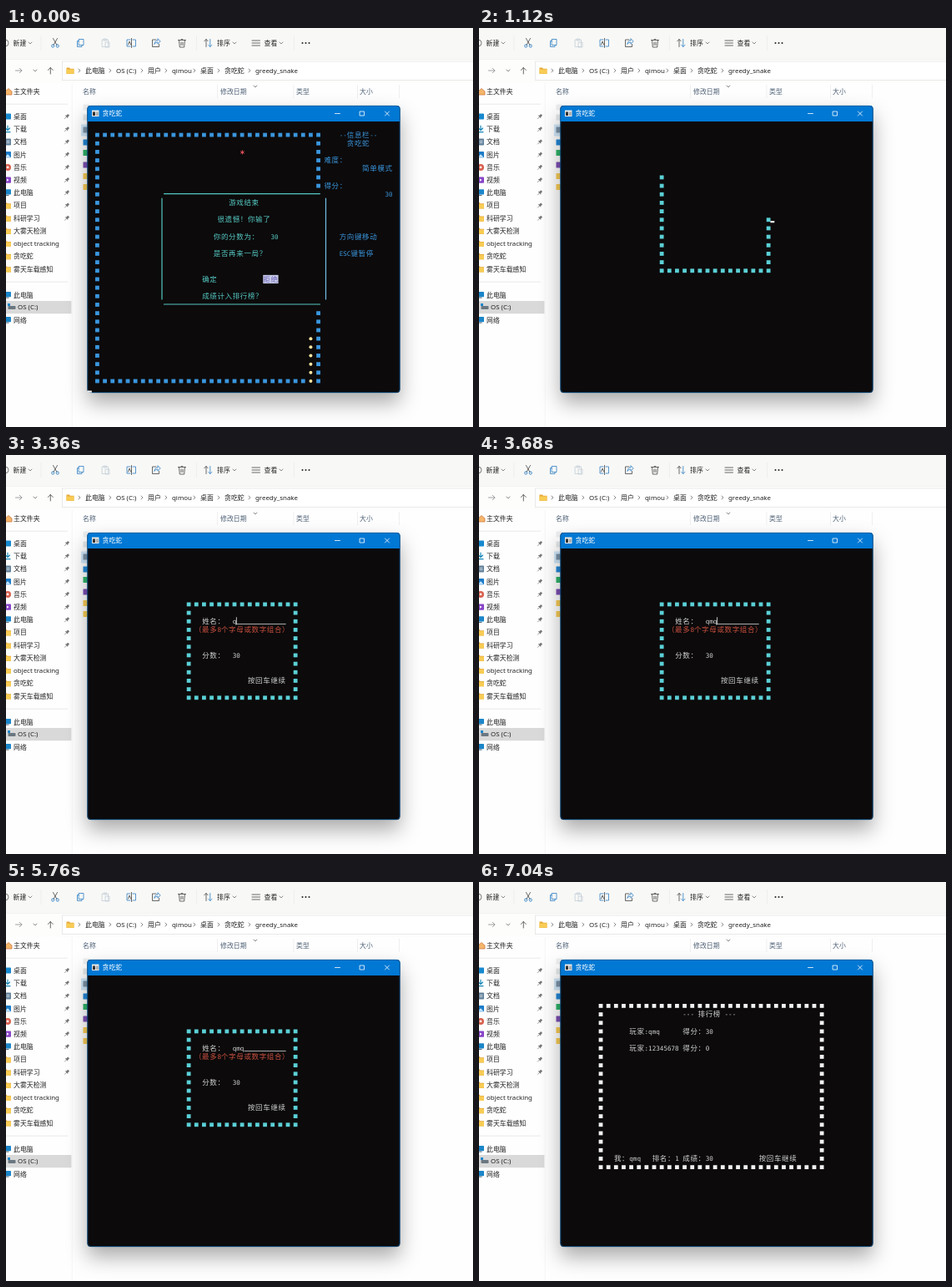
An HTML page for the animation above (7200 ms loop, 560 by 478 pixels).

```html
<!DOCTYPE html>
<html lang="zh-CN">
<head>
<meta charset="utf-8">
<title>贪吃蛇</title>
<style>
  html, body { margin: 0; width: 100%; height: 100%; overflow: hidden; background: #fefefe; }
  svg { display: block; }
  .ui { font: 7.9px "Noto Sans", "Noto Sans CJK SC", "Noto Sans CJK", sans-serif; }
  .cjk { font: 300 8.5px "Noto Sans Mono CJK SC", "Noto Sans CJK SC", "Noto Sans CJK", monospace; letter-spacing: .64px; }
  .mono { font: 7.6px "DejaVu Sans Mono", "Liberation Mono", monospace; }
  .shadow { filter: drop-shadow(0 12px 12px rgba(0, 0, 0, .33)); }
</style>
</head>
<body>
<svg id="stage" width="560" height="478" viewBox="0 0 560 478"></svg>
<script>
const LOOP = 7200, STEP = 160;
const USER = 'qimou', PLAYER = 'qmq';
const BLUE = '#3a96dd', CYAN = '#5bd0d6', TEAL = '#55c8c2', WHITE = '#d2d2d2', RED = '#c8503f';
const INK = '#222', GREY = '#5c5c5c', FOLDER = '#f8cc55';
const stage = document.getElementById('stage');

function el(parent, name, attrs, text) {
  const node = document.createElementNS('http://www.w3.org/2000/svg', name);
  for (const key in attrs) node.setAttribute(key, attrs[key]);
  if (text !== undefined) node.textContent = text;
  return parent.appendChild(node);
}
const group = (parent = stage) => el(parent, 'g', {});
const rect = (p, x, y, width, height, fill, more) => el(p, 'rect', { x, y, width, height, fill, ...more });
const path = (p, d, stroke, width = .8, fill = 'none') =>
  el(p, 'path', { d, stroke, fill, 'stroke-width': width, 'stroke-linecap': 'round', 'stroke-linejoin': 'round' });
const dot = (p, cx, cy, r, fill, more) => el(p, 'circle', { cx, cy, r, fill, ...more });
const label = (x, y, text, fill = INK) => el(stage, 'text', { x, y: y + 2.9, fill, class: 'ui' }, text);
const show = (node, on) => node.setAttribute('visibility', on ? 'inherit' : 'hidden');

// ---------- file manager ----------
const chevron = (x, y, color = GREY) => path(stage, `M${x - 2} ${y - 1}l2 2l2-2`, color, .7);
const vline = (x, y, h, color = '#ebebeb') => rect(stage, x, y, .8, h, color);

function folder(x, y) {
  path(stage, `M${x} ${y - 3.5}h3.5l1 1.2h4.5v6.2h-9z`, 'none', 0, '#e5a93a');
  rect(stage, x, y - 1.6, 9, 5.4, FOLDER, { rx: .6 });
}
function monitor(x, y) {
  rect(stage, x, y - 4, 9, 6.2, '#1b86c9', { rx: .8 });
  rect(stage, x + 2.5, y + 2.6, 4, 1, '#4b6070');
}
function pin(y) {
  const g = el(stage, 'g', { transform: `translate(73 ${y}) rotate(45)` });
  path(g, 'M-1.3-3h2.6v2.6l1.2 1.2h-5l1.2-1.2z', 'none', 0, '#777');
  path(g, 'M0 1v2.6', '#777', .7);
}

function drawToolbar() {
  rect(stage, 0, 0, 560, 38, '#f8f8f6');
  rect(stage, 0, 37.5, 560, .8, '#ededeb');
  dot(stage, -1, 18, 4, 'none', { stroke: GREY, 'stroke-width': .8 });
  label(8.5, 18, '新建');
  chevron(29, 18);
  [41.5, 228, 345].forEach(x => vline(x, 9, 18));

  path(stage, 'M56.5 12.5l4.5 8M61.5 12.5l-4.5 8', '#444');
  [56.2, 61.8].forEach(x => dot(stage, x, 21.5, 1.6, 'none', { stroke: '#2f7fc4', 'stroke-width': .9 }));
  path(stage, 'M87.5 13.5h5.5v7h-5.5zM87.5 15.5h-2v7h5.5v-2', '#2f7fc4');
  path(stage, 'M115.5 14h7v8.5h-7zM117.5 13h3v2h-3zM119.5 17h4.5v6h-4.5z', '#c3ced8');
  path(stage, 'M149 14h-4v8h4M152 14h3.5v8h-3.5', '#2f7fc4');
  path(stage, 'M150.5 12.5v11M146.5 20l1.6-4l1.6 4', '#444');
  path(stage, 'M180 14h-4.5v8.5h8v-3', '#444');
  path(stage, 'M178 19q.5-4 4-4v-2.3l3.2 3.3l-3.2 3.2v-2q-2.5 0-4 1.8z', '#2f7fc4');
  path(stage, 'M206.5 14.5h9M209.5 14.5q1.5-3 3 0M207.5 14.5l.8 8.5h5.4l.8-8.5M210 17v3.5M212 17v3.5', '#444');
  path(stage, 'M240 22.5v-9l-2.2 2.3M240 13.5l2.2 2.3', '#444');
  path(stage, 'M244.8 13.5v9l-2.2-2.3M244.8 22.5l2.2-2.3', '#2f7fc4');
  label(253, 18, '排序');
  chevron(274, 18);
  [15, 18, 21].forEach(y => path(stage, `M295 ${y}h9.5`, '#444'));
  label(309.5, 18, '查看');
  chevron(330, 18);
  [355.5, 359.5, 363.5].forEach(x => dot(stage, x, 18, 1, INK));
}

function drawAddress() {
  rect(stage, 0, 38, 560, 28, '#fdfdfc');
  path(stage, 'M11.5 51h7.5M16.3 48.3l2.7 2.7l-2.7 2.7', '#8a8a8a');
  chevron(35, 51);
  path(stage, 'M53.3 55v-7.5M50.3 50.5l3-3l3 3', '#444');
  rect(stage, 67.5, 40, 500, 22.5, '#fff', { stroke: '#e4e4e4', 'stroke-width': .8 });
  folder(72.5, 51);
  const crumbs = [[95, '此电脑'], [132, 'OS (C:)'], [170, '用户'], [199, USER], [233, '桌面'], [262, '贪吃蛇'], [299, 'greedy_snake']];
  for (const [x, text] of crumbs) {
    path(stage, `M${x - 8} ${49}l2 2l-2 2`, GREY, .7);
    label(x, 51, text);
  }
}

function drawSidebar() {
  const row = i => 106 + 15.22 * i;
  path(stage, 'M-1 76l4-3.5l4 3.5v4h-8z', '#c96f35', .7, '#f5b66b');
  label(9, 76, '主文件夹');
  rect(stage, 0, 90.7, 74, .8, '#e3e3e3');
  rect(stage, 0, 303.7, 74, .8, '#e3e3e3');
  const names = ['桌面', '下载', '文档', '图片', '音乐', '视频', '此电脑', '项目', '科研学习',
    '大雾天检测', 'object tracking', '贪吃蛇', '雾天车载感知'];
  names.forEach((name, i) => {
    const y = row(i);
    label(9, y, name);
    if (i < 9) pin(y);
    if (i > 6) folder(-3, y);
  });
  rect(stage, -2, row(0) - 3.5, 8, 7, '#1789cf', { rx: .8 });
  path(stage, `M2 ${row(1) - 4}v5M-.5 ${row(1) - 1.2}l2.5 2.5l2.5-2.5M-1 ${row(1) + 3.5}h6`, '#1787b8', 1.2);
  rect(stage, -1, row(2) - 4, 7, 8, '#65839c', { rx: .8 });
  path(stage, `M1 ${row(2) - 1}h3M1 ${row(2) + 1}h3`, '#fff', .7);
  rect(stage, -2, row(3) - 3.7, 8, 7.4, '#1c7cc9', { rx: .8 });
  path(stage, `M-1 ${row(3) + 3}l3-3.5l3.5 3.5z`, 'none', 0, '#cfeaff');
  dot(stage, 2, row(4), 4, '#d9604f');
  dot(stage, 2, row(4), 1.4, '#fff');
  rect(stage, -2, row(5) - 3.7, 8, 7.4, '#8844c8', { rx: .8 });
  path(stage, `M1 ${row(5) - 1.6}l2.6 1.6l-2.6 1.6z`, 'none', 0, '#fff');
  monitor(-3, row(6));

  monitor(-3, 320);
  label(9, 320, '此电脑');
  rect(stage, 0, 327, 78.5, 15.2, '#d9d9d9');
  rect(stage, 2.5, 333, 9, 4, '#6b7780', { rx: .8 });
  rect(stage, 2, 330, 3, 3, '#1b86c9');
  label(14, 334.5, 'OS (C:)');
  monitor(-3, 350);
  label(9, 350, '网络');
  vline(78.8, 66, 412, '#f4f4f4');
}

function drawColumns() {
  const heads = [[92, '名称'], [257, '修改日期'], [348, '类型'], [424, '大小']];
  heads.forEach(([x, text]) => label(x, 76, text, '#4f6176'));
  [253, 344.5, 421, 471].forEach(x => vline(x, 68, 16));
  chevron(299, 70);
  rect(stage, 90, 115.5, 10, 14, '#cfe6f8');
  const icons = [[95, '#eceeef'], [107, '#e2e6e8'], [122, '#7c93a8'], [137, '#2488d8'],
    [149.5, '#2fb56a'], [164, '#7d4fb3'], [177.5, FOLDER], [190.5, FOLDER]];
  icons.forEach(([y, color]) => rect(stage, 92.5, y - 3.5, 8, 7, color, { rx: .6 }));
}

function drawWindow() {
  rect(stage, 97.5, 93, 375, 344, '#0c0a0b', { rx: 4, class: 'shadow' });
  path(stage, 'M97.5 112v-15q0-4 4-4h367q4 0 4 4v15z', 'none', 0, '#0078d4');
  rect(stage, 97.8, 93.3, 374.4, 343.4, 'none', { rx: 4, stroke: '#0a5796', 'stroke-width': .8 });
  rect(stage, 103, 98.5, 8.5, 7.5, '#e8e8e8');
  rect(stage, 104, 100.5, 3, 4.5, '#333');
  rect(stage, 108, 100.5, 2.7, 4.5, '#aaa');
  label(115.5, 102.5, '贪吃蛇', '#fff');
  path(stage, 'M394.5 102.5h6M424.5 100h5v5h-5zM454.5 100l5 5M459.5 100l-5 5', '#fff');
}

// ---------- console grid ----------
const CELL = 4.571;
const colX = c => 98 + CELL * c;
const rowY = r => 117.9 + 10.17 * r;
const isWide = ch => ch > '\x7f';

function print(p, c, r, text, fill) {
  for (const run of text.match(/[ -~]+|[^ -~]+/g)) {
    const wide = isWide(run[0]);
    el(p, 'text', { x: colX(c), y: rowY(r) + 2.6, fill, class: wide ? 'cjk' : 'mono', 'xml:space': 'preserve' }, run);
    c += run.length * (wide ? 2 : 1);
  }
}

// Squares run down the left, along the bottom, up the right and back along the top.
function ring(p, c0, r0, c1, r1, fill) {
  const cells = [];
  for (let r = r0; r <= r1; r++) cells.push([c0, r]);
  for (let c = c0 + 2; c <= c1; c += 2) cells.push([c, r1]);
  for (let r = r1 - 1; r >= r0; r--) cells.push([c1, r]);
  for (let c = c1 - 2; c > c0; c -= 2) cells.push([c, r0]);
  return cells.map(([c, r]) => ({ c, r, node: rect(p, colX(c) - .1, rowY(r) - 2.4, 4.8, 4.8, fill) }));
}
const reveal = (cells, n) => cells.forEach((cell, i) => show(cell.node, i < n));

function buildGame() {
  const g = group();
  for (const { c, r, node } of ring(g, 2, 1, 60, 30, BLUE))
    if ((c === 60 && r > 7 && r < 22) || (c === 58 && r === 30)) node.remove();
  for (let r = 25; r <= 30; r++) dot(g, colX(58) + 2.3, rowY(r), 2, '#f9e6a0');
  path(g, `M${colX(40) + 2.6} ${rowY(3) - 1.6}v4.2m-1.9-3.2l3.8 2.2m0-2.2l-3.8 2.2`, '#e0505a', 1);

  [[66, 1, '--信息栏--'], [68, 2, '贪吃蛇'], [62, 4, '难度：'], [72, 5, '简单模式'], [62, 7, '得分：'],
    [78, 8, '30'], [66, 13, '方向键移动'], [66, 15, 'ESC键暂停']].forEach(a => print(g, ...a, BLUE));

  path(g, 'M189.5 198.6H376.5M189.5 331H376.5M187 204V325', TEAL, 1.2);
  path(g, 'M383.5 204V325', '#74bfe6', 1.2);
  [[37, 9, '游戏结束'], [34, 11, '很遗憾！你输了'], [33, 13, '你的分数为：'], [48, 13, '30'],
    [33, 15, '是否再来一局？'], [30, 18, '确定']].forEach(a => print(g, ...a, TEAL));

  const option = (c, r, text) => {
    const plain = group(g), picked = group(g);
    print(plain, c, r, text, TEAL);
    rect(picked, colX(c), rowY(r) - 5.1, text.length * CELL * 2, 10.2, '#c6cbe6');
    print(picked, c, r, text, '#7466bd');
    return on => { show(plain, !on); show(picked, on); };
  };
  return { g, refuse: option(46, 18, '拒绝'), record: option(30, 20, '成绩计入排行榜？') };
}

function buildEntry() {
  const g = group();
  const cells = ring(g, 26, 6, 54, 17, CYAN);
  const form = group(g);
  print(form, 30, 8, '姓名：', WHITE);
  print(form, 28, 9, '（最多8个字母或数字组合）', RED);
  print(form, 30, 12, '分数：', WHITE);
  print(form, 38, 12, '30', WHITE);
  print(form, 42, 15, '按回车继续', WHITE);
  const letters = [...PLAYER].map((ch, i) => {
    const node = group(form);
    print(node, 38 + i, 8, ch, WHITE);
    return node;
  });
  const line = rect(form, 0, rowY(8) + 2.8, 1, .8, WHITE);
  const bar = rect(form, 0, rowY(8) - 5, .9, 9, WHITE);
  return { g, cells, form, letters, line, bar };
}

function buildBoard() {
  const g = group();
  const cells = ring(g, 10, 3, 68, 22, '#f2f2f2');
  const list = group(g);
  [[32, 4, '--- 排行榜'], [43, 4, '---'], [18, 6, '玩家:' + PLAYER], [32, 6, '得分：30'],
    [18, 8, '玩家:12345678'], [32, 8, '得分：0'], [14, 21, '我：' + PLAYER], [24, 21, '排名：1'],
    [32, 21, '成绩：30'], [52, 21, '按回车继续']].forEach(a => print(list, ...a, WHITE));
  return { g, cells, list };
}

drawToolbar();
drawAddress();
drawSidebar();
drawColumns();
drawWindow();
const game = buildGame(), entry = buildEntry(), board = buildBoard();
const caret = rect(stage, 0, 0, CELL + .3, 2.2, '#f2f2f2');

function putCaret(c, r, on) {
  caret.setAttribute('x', colX(c));
  caret.setAttribute('y', rowY(r) + 1.3);
  show(caret, on);
}

function renderGame(t) {
  game.refuse(t < 160);
  game.record(t >= 160);
  putCaret(0, 31, t < 320);
}

function renderEntry(t) {
  const count = Math.min(entry.cells.length, Math.floor(7 + (t - 640) / STEP * 8.6));
  const ready = t >= 1600;
  reveal(entry.cells, count);
  show(entry.form, ready);
  if (!ready) {
    entry.letters.forEach(node => show(node, false));
    show(entry.bar, false);
    const last = entry.cells[count - 1];
    return putCaret(last.c + 1, last.r, true);
  }
  const typed = [3200, 3520, 3680].filter(at => t >= at).length;
  const composing = t >= 3200 && t < 4320;
  const x = colX(38 + typed);
  entry.letters.forEach((node, i) => show(node, i < typed));
  entry.line.setAttribute('x', x);
  entry.line.setAttribute('width', colX(52) - x);
  entry.bar.setAttribute('x', x - .4);
  show(entry.bar, composing);
  const blink = Math.floor((t - (t < 3200 ? 1760 : 4320)) / 480) % 2 === 0;
  putCaret(38 + typed, 8, blink && !composing);
}

function renderBoard(t) {
  const count = Math.min(board.cells.length, 16 * (1 + (t - 6240) / STEP));
  reveal(board.cells, count);
  show(board.list, t >= 7040);
  const last = board.cells[count - 1];
  putCaret(last.c + 1, last.r, t < 7040);
}

const scenes = [
  { from: 6240, g: board.g, render: renderBoard },
  { from: 640, g: entry.g, render: renderEntry },
  { from: 0, g: game.g, render: renderGame }
];

let start, drawn;
function tick(now) {
  start ??= now;
  const t = Math.floor((now - start) % LOOP / STEP) * STEP;
  if (t >= 0 && t !== drawn) {
    drawn = t;
    const scene = scenes.find(s => t >= s.from);
    scenes.forEach(s => s.g.setAttribute('display', s === scene ? 'inline' : 'none'));
    scene.render(t);
  }
  requestAnimationFrame(tick);
}
tick(performance.now());
</script>
</body>
</html>
```
